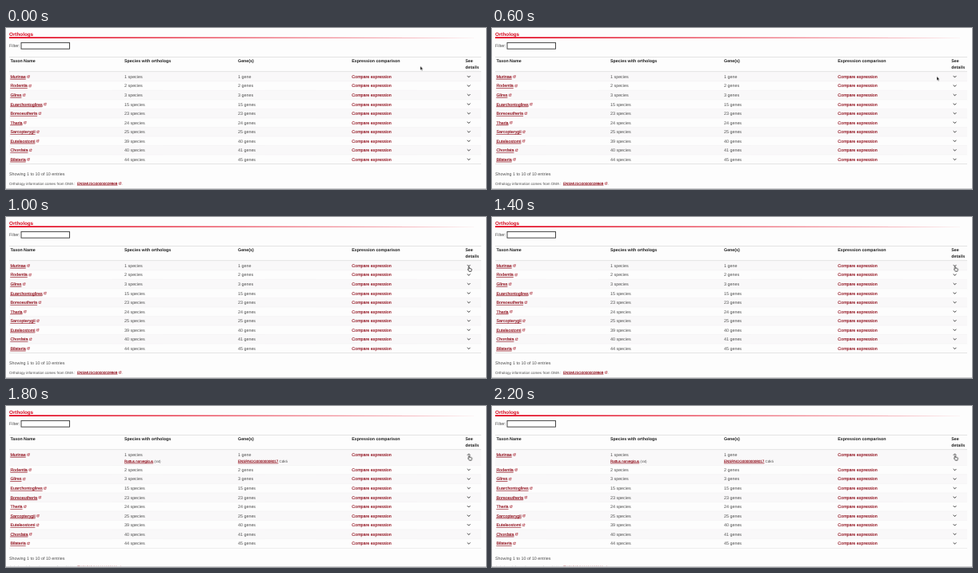
Recreate the animation shown at these times as an HTML page. Size 600 by 202 pixels, loop 3000 ms.

```html
<!DOCTYPE html>
<html lang="en">
<head>
<meta charset="utf-8">
<title>Orthologs</title>
<style>
html, body { margin: 0; width: 100%; height: 100%; overflow: hidden; background: #fdfdfd; }
svg { display: block; width: 600px; height: 202px; }
text { font: 5.37px "Liberation Sans", Arial, sans-serif; fill: #4c4c4c; text-rendering: geometricPrecision; white-space: pre; }
.head { font-weight: bold; font-size: 5.32px; fill: #1c1c1c; }
.title { font-weight: bold; font-size: 6.3px; fill: #d4061c; }
.small { font-size: 4.5px; }
.red, .link { fill: #8c0714; stroke: #8c0714; stroke-width: .12; }
.link { text-decoration: underline; text-decoration-thickness: .65px; text-underline-offset: .5px; }
.stripe { fill: #f9f8f9; }
.rule { stroke: #f0eff0; stroke-width: .5; }
.strong { stroke: #d2d2d2; stroke-width: .6; }
.icon { fill: none; stroke: #a8232f; stroke-width: .6; }
.chevron { fill: none; stroke: #222; stroke-width: .9; }

.below, .detail, .turn, .arrow, .hand { animation: 3s step-end infinite; }
.below { animation-name: push; }
.detail { animation-name: reveal; }
.turn { animation-name: turn; }
.arrow { animation-name: glide; }
.hand { animation-name: point; }

@keyframes push { 0% { transform: none; } 50%, 100% { transform: translateY(7.5px); } }
@keyframes reveal { 0% { opacity: 0; } 50%, 100% { opacity: 1; } }
@keyframes turn {
  0% { transform: rotate(0deg); }
  50% { transform: rotate(70deg); }
  53.333% { transform: rotate(150deg); }
  56.666%, 100% { transform: rotate(180deg); }
}
@keyframes glide {
  0% { transform: translate(517.8px, 47.8px); }
  3.333% { transform: translate(523px, 49.5px); }
  6.666% { transform: translate(531px, 52.2px); }
  10% { transform: translate(539px, 55px); }
  13.333% { transform: translate(545.5px, 57px); }
  16.666% { transform: translate(551px, 59.3px); }
  20% { transform: translate(556px, 60.8px); }
  23.333% { transform: translate(566px, 62.3px); }
  26.666% { transform: translate(573.7px, 63px); opacity: 1; }
  30%, 100% { transform: translate(577px, 62px); opacity: 0; }
}
@keyframes point {
  0% { transform: translate(576.3px, 62.3px); opacity: 0; }
  30% { transform: translate(576.3px, 62.3px); opacity: 1; }
  33.333% { transform: translate(577px, 62px); opacity: 1; }
  36.666%, 100% { transform: translate(577.3px, 61.8px); opacity: 1; }
}
</style>
</head>
<body>
<svg viewBox="0 0 600 202">
  <text class="title" x="4" y="10.3">Orthologs</text>
  <path d="M4 11.3L594 12.1L4 12.9Z" fill="#e2001a"/>
  <text x="4" y="24">Filter:</text>
  <rect x="19" y="18.4" width="60.5" height="7.8" fill="#fff" stroke="#333" stroke-width=".9"/>
  <path class="strong" d="M4 36.5H594"/>
  <g id="head"></g>
  <g id="first"></g>
  <g class="detail">
    <rect class="stripe" x="4" y="66" width="590" height="8.5"/>
    <text class="small" x="148" y="70.7"><tspan class="link">Rattus norvegicus</tspan> (rat)</text>
    <text class="small" x="290" y="70.7"><tspan class="link">ENSRNOG00000008017</tspan> Cdk5</text>
  </g>
  <g class="below">
    <g id="rest"></g>
    <path class="strong" d="M4 170.6H594"/>
    <text x="4" y="185">Showing 1 to 10 of 10 entries</text>
    <text class="small" x="4" y="196.7" style="font-size:4.56px">Orthology information comes from OMA :</text>
    <text class="small link" x="89" y="196.7">ENSMUSG00000028969</text>
    <text class="small" x="144.4" y="196.7">.</text>
  </g>
  <path class="strong" d="M4 54.6H594"/>
  <rect y="201" width="600" height="1" fill="#cfcfd2"/>
  <g class="arrow">
    <path d="M0 0V4.9L1.2 3.9L2 5.7L2.9 5.3L2.1 3.6H3.6Z" fill="#111" stroke="#fff" stroke-width=".4"/>
  </g>
  <g class="hand">
    <path d="M1.1 3.6V.8Q1.6 0 2.1 .8V2.5Q2.8 2 3.2 2.7Q3.9 2.3 4.2 3Q5 2.8 5 3.6V4.7Q4.8 5.4 4.4 6.3H1.9Q1.3 5.1 .3 4.1Q.2 3.3 1.1 3.8Z" fill="#fff" stroke="#111" stroke-width=".75" stroke-linejoin="round"/>
  </g>
</svg>
<script>
const NS = "http://www.w3.org/2000/svg";
const columns = [5.4, 148, 290, 432.3];
const pitch = 11.54;
const rows = [
  ["Murinae", 1, 1], ["Rodentia", 2, 2], ["Glires", 3, 3], ["Euarchontoglires", 15, 15],
  ["Boreoeutheria", 23, 23], ["Theria", 24, 24], ["Sarcopterygii", 25, 25],
  ["Euteleostomi", 39, 40], ["Chordata", 40, 41], ["Bilateria", 44, 45]
];

function add(parent, tag, attrs, text) {
  const node = document.createElementNS(NS, tag);
  for (const key in attrs) node.setAttribute(key, attrs[key]);
  if (text) node.textContent = text;
  return parent.appendChild(node);
}

const label = (parent, x, y, text, cls = "") => add(parent, "text", { x, y, class: cls }, text);

const linkIcon = (parent, x, y) => add(parent, "path", {
  class: "icon",
  transform: `translate(${x} ${y})`,
  d: "M0-1H-1.3V1.3H1V0M-.2.2L1.2-1.2M.2-1.3H1.3V-.2"
});

const head = document.getElementById("head");
["Taxon Name", "Species with orthologs", "Gene(s)", "Expression comparison"]
  .forEach((name, i) => label(head, columns[i], 43.1, name, "head"));
label(head, 574.3, 43.1, "See", "head");
label(head, 574.3, 50.6, "details", "head");

rows.forEach(([taxon, species, genes], i) => {
  const group = document.getElementById(i ? "rest" : "first");
  const mid = 61 + i * pitch;
  const base = mid + 1.9;
  const top = mid - pitch / 2;
  if (i % 2 === 0) add(group, "rect", { class: "stripe", x: 4, y: top, width: 590, height: pitch });
  if (i) add(group, "path", { class: "rule", d: `M4 ${top}H594` });
  const name = label(group, columns[0], base, taxon, "link");
  linkIcon(group, columns[0] + name.getComputedTextLength() + 3.3, mid);
  label(group, columns[1], base, species + " species");
  label(group, columns[2], base, genes + (genes > 1 ? " genes" : " gene"));
  label(group, columns[3], base, "Compare expression", "red");
  const spot = add(group, "g", { transform: `translate(578.5 ${mid - .1})` });
  add(spot, "path", { class: i ? "chevron" : "chevron turn", d: "M-1.8-.9L0 .9L1.8-.9" });
});
linkIcon(document.getElementById("rest"), 142.6, 195);
</script>
</body>
</html>
```
